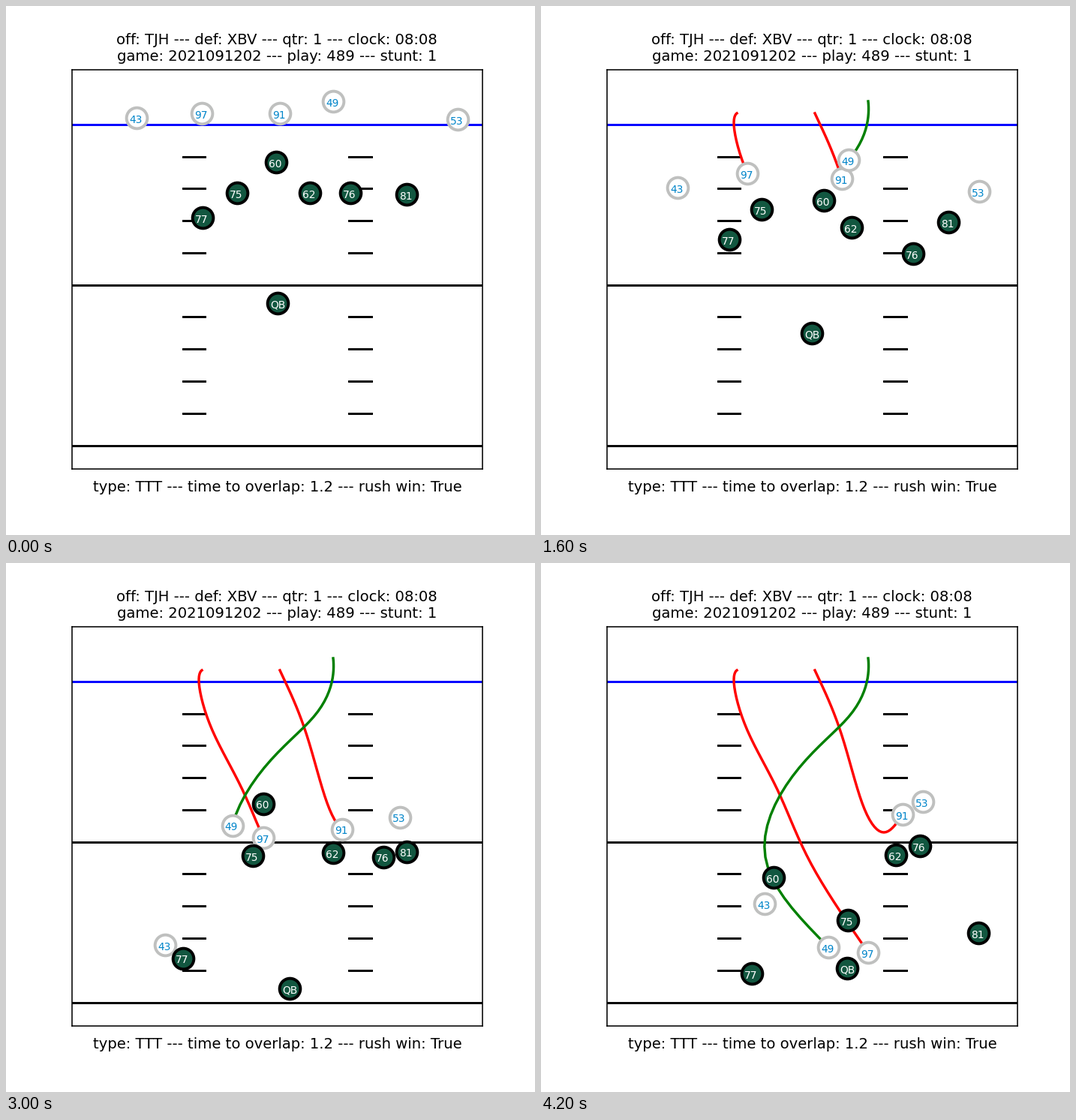
Animation of 705x705 px, one loop 4300 ms. Source, as a matplotlib script:

```python
import numpy as np
import matplotlib.pyplot as plt
from matplotlib.animation import FuncAnimation

SIZE, DPI = 705, 141
N_FRAMES, INTERVAL = 43, 100
LEFT, RIGHT, TOP, BOTTOM = 88.125, 634.5, 84.6, 616.875

# Frames at which every player passes one of the points listed below
BEATS = np.array([0, 7, 16, 24, 33, 42])

DEFENCE = {
    "43": [(174, 149), (172, 150), (182, 242), (208, 422), (220, 522), (298, 454)],
    "97": [(261, 143), (257, 155), (275, 223), (315, 302), (360, 401), (436, 519)],
    "91": [(365, 143), (372, 158), (401, 230), (428, 320), (457, 359), (482, 335)],
    "49": [(436, 127), (436, 148), (410, 205), (344, 273), (299, 392), (383, 512)],
    "53": [(602, 151), (602, 159), (584, 247), (531, 315), (527, 341), (509, 318)],
}
OFFENCE = {
    "77": [(262, 282), (262, 282), (251, 311), (231, 425), (245, 559), (281, 547)],
    "75": [(308, 249), (308, 245), (294, 271), (306, 325), (345, 421), (409, 476)],
    "60": [(360, 208), (362, 214), (377, 259), (364, 296), (333, 338), (310, 419)],
    "62": [(405, 249), (405, 251), (414, 295), (425, 355), (444, 394), (473, 389)],
    "76": [(459, 249), (460, 252), (496, 330), (505, 381), (502, 391), (505, 377)],
    "81": [(534, 251), (536, 251), (543, 288), (532, 354), (541, 402), (583, 493)],
    "QB": [(362, 396), (361, 395), (361, 436), (366, 540), (386, 565), (408, 540)],
}


def spline(points):
    """Cubic spline through the beats, starting at rest, one row per frame."""
    p = np.array(points, dtype=float)
    h = np.diff(BEATS)
    slope = np.diff(p, axis=0) / h[:, None]

    n = len(p)
    a, b = np.eye(n), np.zeros_like(p)
    for k in range(1, n - 1):
        a[k, k - 1:k + 2] = h[k], 2 * (h[k - 1] + h[k]), h[k - 1]
        b[k] = 3 * (h[k] * slope[k - 1] + h[k - 1] * slope[k])
    a[-1, -2:] = 1, 2
    b[-1] = 3 * slope[-1]
    m = np.linalg.solve(a, b)

    frames = np.arange(N_FRAMES)
    i = np.clip(np.searchsorted(BEATS, frames, side="right") - 1, 0, n - 2)
    step = h[i][:, None]
    u = (frames - BEATS[i])[:, None] / step
    return ((1 + 2 * u) * (1 - u) ** 2 * p[i]
            + u * (1 - u) ** 2 * step * m[i]
            + u ** 2 * (3 - 2 * u) * p[i + 1]
            + u ** 2 * (u - 1) * step * m[i + 1])


plt.rcParams["font.family"] = "DejaVu Sans"
fig = plt.figure(figsize=(SIZE / DPI, SIZE / DPI), dpi=DPI, facecolor="white")

# Data units are stage pixels, with y pointing down.
ax = fig.add_axes([LEFT / SIZE, 1 - BOTTOM / SIZE,
                   (RIGHT - LEFT) / SIZE, (BOTTOM - TOP) / SIZE])
ax.set(xlim=(LEFT, RIGHT), ylim=(BOTTOM, TOP), xticks=[], yticks=[])
ax.set_title("off: TJH --- def: XBV --- qtr: 1 --- clock: 08:08\n"
             "game: 2021091202 --- play: 489 --- stunt: 1", fontsize=10)
ax.set_xlabel("type: TTT --- time to overlap: 1.2 --- rush win: True",
              fontsize=10, labelpad=7.5)

# Yard lines and hash marks
for k in range(11):
    y = 157.8 + 42.78 * k
    if k % 5 == 0:
        ax.plot([LEFT, RIGHT], [y, y], lw=1.5, zorder=1,
                color="black" if k else "blue")
    else:
        for x in (235.7, 457.2):
            ax.plot([x, x + 29.6], [y, y], color="black", lw=1.5, zorder=1)


class Team:
    def __init__(self, roster, face, edge, ink, zorder):
        self.paths = {name: spline(points) for name, points in roster.items()}
        self.dots = ax.scatter([0] * len(roster), [0] * len(roster), s=200,
                               c=face, edgecolors=edge, linewidths=2,
                               zorder=zorder)
        self.labels = [ax.text(0, 0, name, color=ink, fontsize=7,
                               zorder=zorder + 1) for name in roster]

    def move(self, frame):
        spots = [path[frame] for path in self.paths.values()]
        self.dots.set_offsets(spots)
        for label, (x, y) in zip(self.labels, spots):
            label.set_position((x - 10, y + 6.5))


defence = Team(DEFENCE, "white", "#bfc0bf", "#0085ca", 3)
offence = Team(OFFENCE, "#125740", "black", "white", 5)

trails = {}
for name, color in (("97", "red"), ("91", "red"), ("49", "green")):
    trails[name], = ax.plot([], [], color=color, lw=1.75, zorder=2)


def draw(frame):
    defence.move(frame)
    offence.move(frame)
    for name, line in trails.items():
        line.set_data(*defence.paths[name][:frame + 1].T)
    return []


anim = FuncAnimation(fig, draw, frames=N_FRAMES, interval=INTERVAL,
                     repeat=True, repeat_delay=0, blit=False)
plt.show()
```
